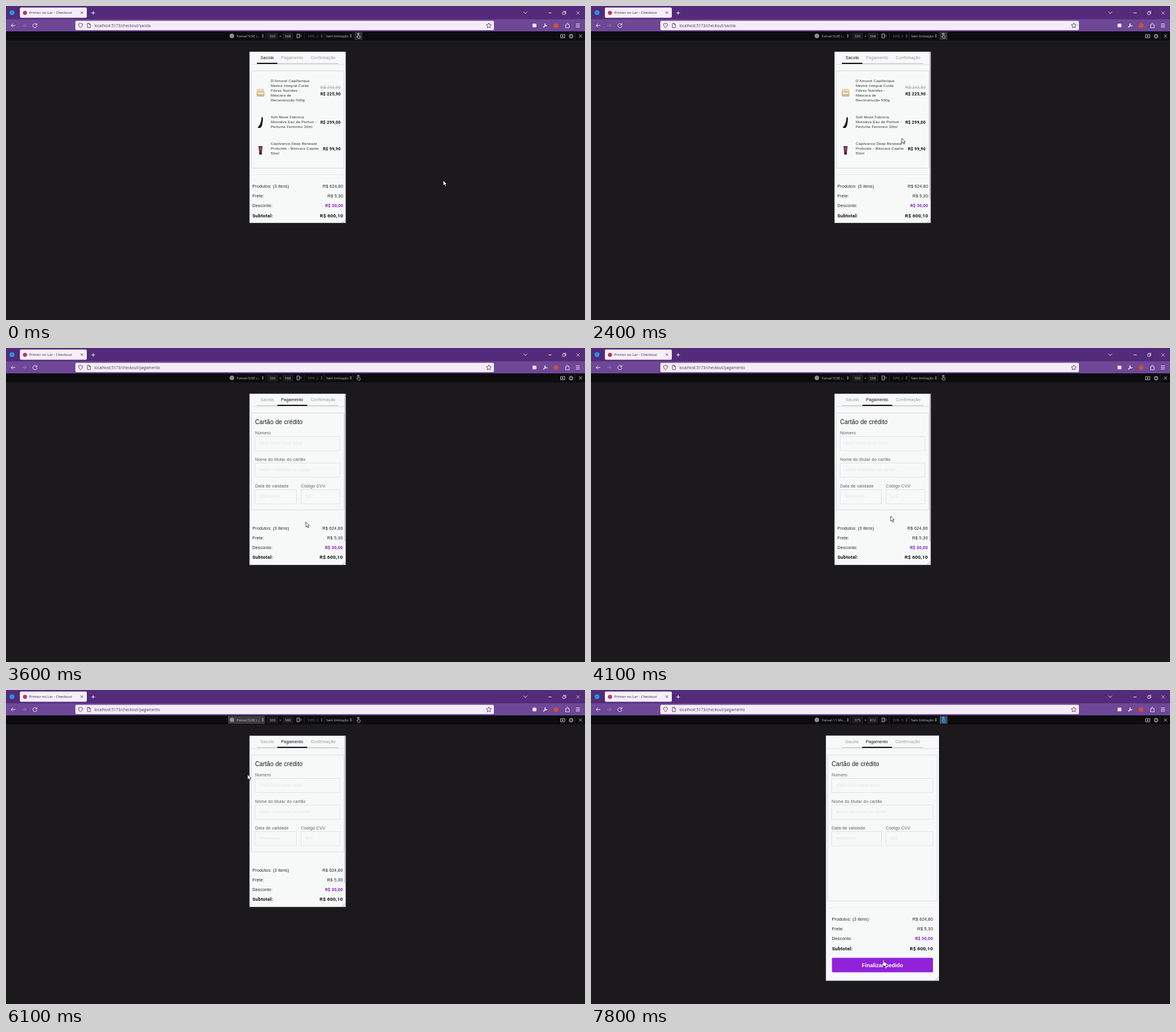
Animation of 960 by 520 pixels, one loop 8000 ms. Source, as an HTML page:

```html
<!DOCTYPE html>
<html lang="pt-BR">
<head>
<meta charset="utf-8">
<title>Checkout</title>
<style>
  html, body { margin: 0; width: 100%; height: 100%; overflow: hidden; background: #1c191c; }
  svg { display: block; width: 960px; height: 520px; }
  text { white-space: pre; }
  .ui { font-family: "Open Sans", "Noto Sans", sans-serif; }
  .page { font-family: "Liberation Sans", Arial, sans-serif; letter-spacing: .2px; }
  .tab { font-family: "Liberation Sans", Arial, sans-serif; letter-spacing: .12px; }
  .bold { font-family: Roboto, sans-serif; font-weight: 700; letter-spacing: .2px; }
  .button { font-family: "Liberation Sans", Arial, sans-serif; font-weight: 700; }
</style>
</head>
<body>
<svg id="stage" viewBox="0 0 960 520" xmlns="http://www.w3.org/2000/svg"></svg>
<script>
const LOOP = 8000, STEP = 100;
const RELOAD = 1000, IMAGES_BACK = 1500, PAY = 3200, MENU = 5700, RESIZE = 6200;

const text = (x, y, s, size, fill, cls = 'page', extra = '') =>
  `<text x="${x}" y="${y}" font-size="${size}" fill="${fill}" class="${cls}" ${extra}>${s}</text>`;
const right = (x, y, s, size, fill, cls, extra = '') =>
  text(x, y, s, size, fill, cls, `text-anchor="end" ${extra}`);
const rect = (x, y, w, h, fill, extra = '') =>
  `<rect x="${x}" y="${y}" width="${w}" height="${h}" fill="${fill}" ${extra}/>`;
const frame = (x1, y1, x2, y2, stroke, r = 0) =>
  rect(x1, y1, x2 - x1, y2 - y1, 'none', `stroke="${stroke}" stroke-width=".8" rx="${r}"`);
const line = (d, stroke, w = 1, fill = 'none') =>
  `<path d="${d}" stroke="${stroke}" stroke-width="${w}" fill="${fill}"/>`;
const dot = (x, y, r, fill) => `<circle cx="${x}" cy="${y}" r="${r}" fill="${fill}"/>`;
const group = (id, body, extra = '') => `<g id="${id}" ${extra}>${body}</g>`;
const updown = (x, fill) =>
  `<path d="M${x - 1.5} 48.8l1.5-2 1.5 2zM${x - 1.5} 50.3l1.5 2 1.5-2z" fill="${fill}"/>`;

function browser() {
  const pale = '#eee6f5', ink = '#3b2d49', grey = '#c4c4c8';
  return rect(0, 0, 960, 22, '#542a7a') + rect(0, 22, 960, 20, '#6e4797') +
    dot(10, 11, 4, '#2196dc') +
    rect(23, 2.5, 111, 17, '#f6effa', 'rx="2"') + dot(31.5, 11.3, 3.4, '#b5395f') +
    text(38.5, 13.4, 'Primor no Lar - Checkout', 6.1, '#2b2136', 'ui') +
    line('M123.7 9l4 4m0-4l-4 4', ink, .8) + line('M141.5 11.5h6m-3-3v6', pale) +
    line('M858 9.5l3 3 3-3M899.5 11.5h5', pale) +
    line('M923 10h4v4h-4zM924.5 10V8.7h3.8v3.8H927M946 9l5 5m0-5l-5 5', pale, .8) +
    line('M15.5 32.3h-7m3-3l-3 3 3 3', pale) + line('M26.5 32.3h7m-3-3l3 3-3 3', '#9678b4') +
    line('M50.7 30.5a3.4 3.4 0 1 0 .6 2.5M51.3 28.6v2.6h-2.6', pale) +
    rect(115, 24.5, 694, 15.5, '#f4ecf8', 'rx="2"') +
    line('M123.5 28.5l3.2 1q.2 5-3.2 6.6-3.4-1.6-3.2-6.6z', ink, .8) +
    line('M135 28.7h3l2 2v5h-5zM138 28.7v2h2', ink, .8) +
    text(146.5, 34.7, 'localhost:5173/checkout/<tspan id="route"></tspan>', 6.4, '#473a54', 'ui') +
    line('M800.5 28l1.3 2.7 2.9.4-2.1 2.1.5 3-2.6-1.4-2.6 1.4.5-3-2.1-2.1 2.9-.4z', ink, .8) +
    rect(873, 29.3, 6.4, 6, pale, 'rx="1"') +
    line('M890.8 35.5l4-4', pale, 1.6) + line('M894.5 29.2a2 2 0 1 0 2.7 2.7', pale, 1.4) +
    dot(912, 32.5, 4, '#c9503f') +
    line('M927.5 31h2v-1.5a1.2 1.2 0 0 1 2.4 0V31h2v5h-6.4v-1.6a1.1 1.1 0 0 0 0-2.2z', pale, .9) +
    line('M945 29.7h6.4m-6.4 2.6h6.4m-6.4 2.6h6.4', pale) +
    rect(0, 42, 960, 15, '#0c0c0e') +
    group('hover', rect(368, 43, 61, 13, '#3b3b40')) +
    dot(374.5, 49.5, 3.8, '#8b8b90') +
    text(382.5, 51.7, '<tspan id="device"></tspan>', 5.7, grey, 'ui') + updown(425.8, grey) +
    rect(433, 44, 18, 11.5, '#1c1c20') + rect(459, 44, 17, 11.5, '#1c1c20') +
    text(437, 51.8, '<tspan id="width"></tspan>', 5.7, grey, 'ui') +
    text(453.2, 51.6, '×', 5.5, grey, 'ui') +
    text(462.4, 51.8, '<tspan id="height"></tspan>', 5.7, grey, 'ui') +
    line('M430.5 43v13M494.5 43v13M527.5 43v13M575.5 43v13', '#303035', .7) +
    line('M482.5 46.3h4v6.4h-4zM488 47.5l1.6 1.8-1.6 1.8', grey, .9) +
    text(500.5, 51.7, '<tspan id="dpr"></tspan>', 5.7, '#68686d', 'ui') + updown(523.3, '#77777c') +
    text(530.8, 51.7, 'Sem limitação', 5.7, grey, 'ui') + updown(571.8, grey) +
    rect(578, 43, 13, 13, '#303036', 'id="touchBox"') +
    `<g id="touchIcon">${line('M583.3 50.5v-4a.8.8 0 0 1 1.6 0v2.4l2.3.8q.5 2-.6 3.6h-2.9l-2.2-2.6q.6-.8 1.8.3M581.8 46.7a2.4 2.4 0 0 1 4.6 0', 'currentColor', .8)}</g>` +
    line('M919.5 47.3h7v5.3h-7z', grey, .9) + dot(923, 50, 1.2, grey) +
    line('M937 46v1.5m0 5V54m-4-4h1.5m5 0h1.5m-6.8-2.8l1 1m3.6 3.6l1 1m0-5.6l-1 1m-3.6 3.6l-1 1', grey, 1.2) +
    `<circle cx="937" cy="50" r="2.2" fill="none" stroke="${grey}"/>` +
    line('M943.5 43v13', '#303035', .7) + line('M950 47.3l5 5m0-5l-5 5', grey, .9);
}

// Tabs shared by both steps; the viewport is always centred near x = 483.5.
function header(L, R, active, shift) {
  const tabs = [['Sacola', 422, 416, 450], ['Pagamento', 456, 450, 499.5], ['Confirmação', 505.2, 499.5, 551]];
  const [, , from, to] = tabs[active];
  return line(`M${L} 97H${R}`, '#dfdfe1') + `<g transform="translate(${shift})">` +
    line('M416 95.3H551', '#bcb0c0', .9) + rect(from, 94, to - from, 2, '#141018') +
    tabs.map(([s, x], i) => text(x, 88, s, 7, i == active ? '#15121a' : '#97979b', 'tab')).join('') + '</g>';
}

function summary(l, r, y, button) {
  const rows = [['Produtos: (3 itens)', 'R$ 624,80'], ['Frete:', 'R$ 5,30'], ['Desconto:', 'R$ 30,00']];
  return rows.map(([name, price], i) => text(l, y + 16 * i, name, 7, '#222') +
    right(r, y + 16 * i, price, 7, i == 2 ? '#861fc9' : '#222', i == 2 ? 'bold' : 'page')).join('') +
    text(l, y + 48.5, 'Subtotal:', 8, '#111', 'bold') + right(r, y + 48.5, 'R$ 600,10', 8, '#111', 'bold') +
    rect(l, y + 61.5, r - l, 24, '#9222da', 'rx="1.5"') +
    text((l + r) / 2, y + 76.6, button, 9, '#fff', 'button', 'text-anchor="middle"');
}

const card = (L, R, bottom) => frame(L + 3, 107.5, R - 3, bottom, '#cfcfd2', 2);

function bag() {
  const L = 403.5, R = 563.5;
  const products = [
    [126.2, 147.6, 'R$ 225,90', ["D'Amuvel Capillarique", 'Mestre Integral Cuida', 'Fibrax Nutridex -', 'Máscara de', 'Reconstrução 500g']],
    [186.2, 194.6, 'R$ 299,00', ['Soft Muse Fabrícia', 'Montalva Eau de Parfum -', 'Perfume Feminino 30ml']],
    [230.2, 238.6, 'R$ 99,90', ['Capilvance Deep Renewal', 'Profundo - Máscara Capilar', '50ml']]
  ];
  const photos = rect(415.5, 141, 13, 9, '#d3b88c', 'rx="1.5"') + rect(416, 137, 12, 4.5, '#e8d8b8', 'rx="1"') +
    rect(417, 143, 10, 3, '#f0e7d5') +
    `<path d="M424 183.5q2.3.5 2 5l-1 7q-1 5-3.5 6.5h-4q0-2 2-3.5 3-3 4.500-15z" fill="#1d181f"/>` +
    `<path d="M418.500 232h7l-1.300 11h-4.400z" fill="#70304a"/>` + rect(419.8, 242.5, 4.4, 3.5, '#2c1620') +
    rect(420.5, 235, 3, 3, '#a05a75');
  return header(L, R, 0, 0) + card(L, R, 268.5) + group('photos', photos) +
    products.map(([y, priceY, price, lines]) =>
      lines.map((s, i) => text(439, y + 8 * i, s, 6, '#2a2a2a', 'page', 'style="letter-spacing:.26px"')).join('') +
      right(555, priceY, price, 7, '#111', 'bold')).join('') +
    right(555, 137.4, 'R$ 243,90', 7, '#a6a6a8', 'page', 'text-decoration="line-through"') +
    line('M407 279.5H560', '#e6e6e8', .8) + summary(408.5, 559, 301, 'Seguir para o pagamento');
}

function payment(L, R, cardBottom, pad, y, shift) {
  const l = L + 9.5, r = R - 10;
  const field = (x1, x2, top, label, hint) =>
    text(x1, top - 4, label, 7, '#5a5a5d') + frame(x1, top, x2, top + 23.5, '#dcdcdf') +
    text(x1 + 7.5, top + 13.8, hint, 7, '#e1e3e4');
  return header(L, R, 1, shift) + card(L, R, cardBottom) +
    text(l, 125.6, 'Cartão de crédito', 10, '#18151b', 'tab') +
    field(l, r, 146.5, 'Número', '0000 0000 0000 0000') +
    field(l, r, 190.500, 'Nome do titular do cartão', 'Nome impresso no cartão') +
    field(l, 481.5, 234.5, 'Data de validade', 'MM/AAAA') + field(489, r, 234.5, 'Código CVV', '000') +
    summary(L + pad, R - pad, y, 'Finalizar pedido');
}

const grip = (x, y) => line(`M${x - 6} ${y}l6-6M${x - 3} ${y}l3-3`, '#9a9a9e', .7);
const arrow = line('M0 0V8.300L2 6.600 3.400 9.800 4.900 9.100 3.500 6H6z', '#18151b', .7, '#fff');
const beam = line('M-2-4h1.500l.5.6.500-.6H2M0-3.400V3.400M-2 4h1.500l.5-.6.500.6H2', '#333', .9);
const hand = line('M-.8 5V.6a.9.900 0 0 1 1.800 0V4l3.400.8q1 .4.700 2l-.8 3.200H0L-2.600 6q.5-1 1.800 0z', '#222', .6, '#fff');

const stage = document.getElementById('stage');
stage.innerHTML =
  '<clipPath id="small"><rect x="403.5" y="75.5" width="160" height="284"/></clipPath>' +
  rect(0, 0, 960, 520, '#1c191c') + browser() +
  group('smallView', rect(403.5, 75.5, 160, 284, '#f7f9f9') +
    group('scroller', group('bag', bag()) + group('pay', payment(403.5, 563.5, 268, 5, 300.6, 0))) +
    rect(561, 76, 2.3, 244, '#c9c9cd', 'id="thumb"') + grip(563, 359), 'clip-path="url(#small)"') +
  group('largeView', rect(389.5, 75.5, 187.5, 406, '#f7f9f9') +
    payment(389.5, 577, 349.5, 10, 382, -.5) + line('M393 360.5H574', '#f0e4e6', .8) + grip(576.5, 481)) +
  group('cursor', group('arrow', arrow) + group('beam', beam) + group('hand', hand));

const el = id => document.getElementById(id);
const show = (id, on) => el(id).style.display = on ? '' : 'none';
const say = (id, s) => el(id).textContent = s;

// Each key holds a time followed by its values.
const cursorPath = [
  [0, 725, 289], [800, 725, 289], [1400, 624, 255], [1600, 515, 219], [2800, 515.5, 219],
  [3100, 497, 336], [3300, 497, 336], [3600, 497, 288], [4000, 497, 288], [4500, 496.5, 241],
  [4800, 494, 215], [5300, 470, 130], [5500, 470, 130], [5800, 398, 50], [6100, 400.5, 140],
  [6300, 402, 160], [7200, 455, 330], [7700, 485, 447], [8000, 485, 447]
];
const scrollPath = [[0, 0], [2700, 0], [2800, 1], [3000, 44], [8000, 44]];

function at(path, t) {
  const i = path.findIndex(k => k[0] > t), a = path[i - 1], b = path[i];
  const u = (t - a[0]) / (b[0] - a[0]);
  return a.slice(1).map((v, n) => v + (b[n + 1] - v) * u);
}

function cursorKind(x, y, t, scroll) {
  const inside = (x1, y1, x2, y2) => x > x1 && x < x2 && y > y1 && y < y2;
  if (t >= RESIZE) {
    if (inside(399, 443, 567, 468)) return 'hand';
  } else if (t < PAY) {
    return inside(408, 362 - scroll, 559, 387 - scroll) ? 'hand' : 'arrow';
  }
  const fields = [[413, 146, 554, 170], [413, 190, 554, 214], [413, 234, 481, 258], [489, 234, 554, 258]];
  return t < MENU && fields.some(f => inside(...f)) ? 'beam' : 'arrow';
}

function draw(t) {
  const paying = t >= PAY, large = t >= RESIZE;
  const [x, y] = at(cursorPath, t);
  const scroll = paying ? 0 : at(scrollPath, t)[0];
  const kind = cursorKind(x, y, t, scroll);

  say('route', paying ? 'pagamento' : 'sacola');
  say('device', large ? 'Fonvel 11 Mx...' : 'Fonvel 5/XE i...');
  say('width', large ? 375 : 320);
  say('height', large ? 812 : 568);
  say('dpr', large ? 'DPR: 3' : 'DPR: 2');
  show('hover', t >= MENU && !large);
  show('touchBox', !paying || large);
  el('touchBox').setAttribute('fill', large ? '#36516f' : '#303036');
  el('touchIcon').style.color = large ? '#75bfff' : '#c4c4c8';

  show('smallView', !large);
  show('largeView', large);
  show('bag', !paying);
  show('pay', paying);
  show('photos', t < RELOAD || t >= IMAGES_BACK);
  show('thumb', t >= RELOAD);
  el('scroller').setAttribute('transform', `translate(0 ${-scroll})`);
  el('thumb').setAttribute('y', 76 + scroll * .86);

  for (const id of ['arrow', 'beam', 'hand']) show(id, id === kind);
  el('cursor').setAttribute('transform', `translate(${x} ${y})`);
}

function tick() {
  draw(Math.floor(performance.now() % LOOP / STEP) * STEP);
  requestAnimationFrame(tick);
}
tick();
</script>
</body>
</html>
```
